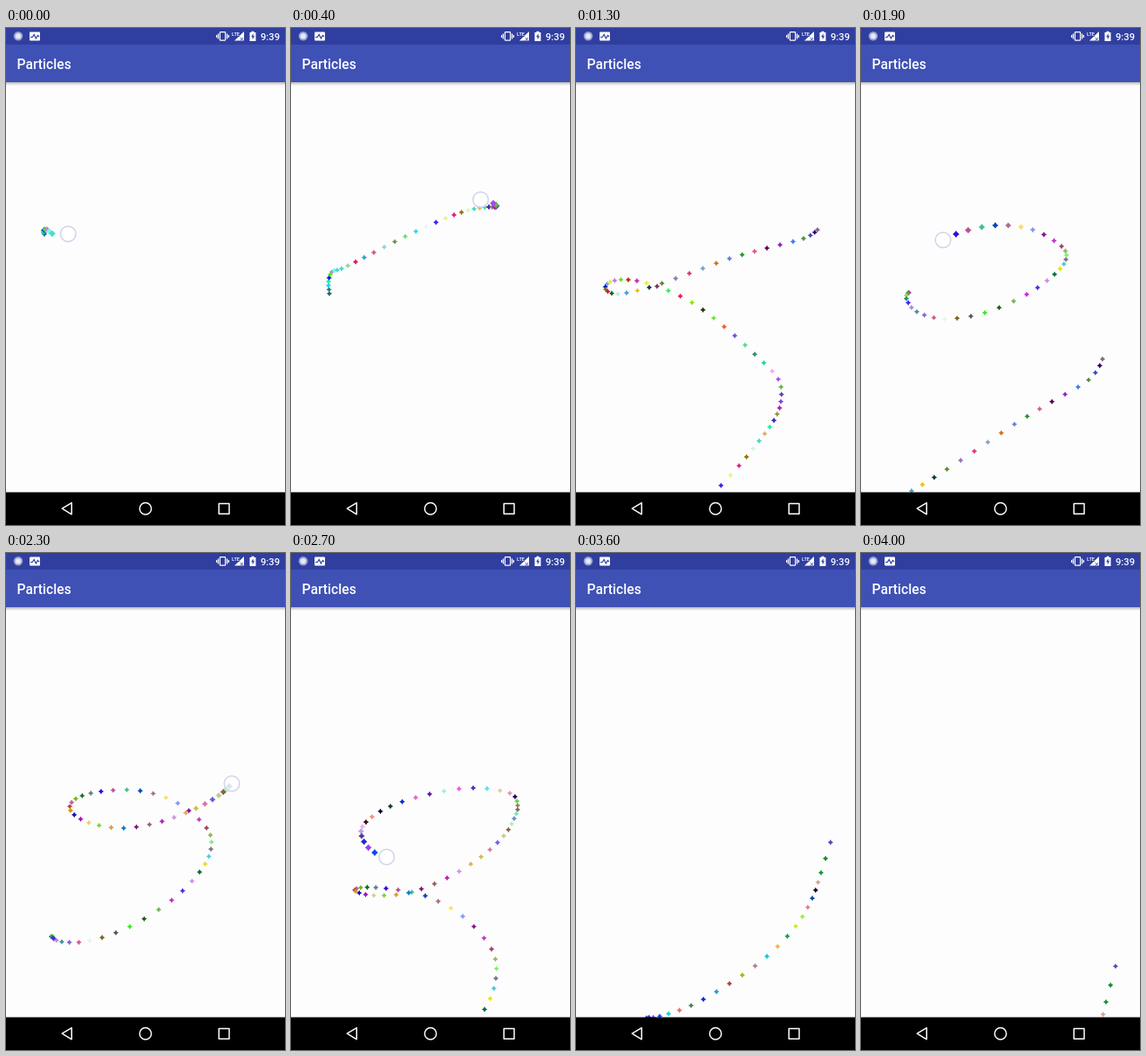
Animation, 320 px wide and 569 px high, one loop 4.1 s. Source, as an HTML page with a canvas:

```html
<!DOCTYPE html>
<html lang="en">
<head>
<meta charset="utf-8">
<title>Particles</title>
<style>
  html, body { margin: 0; width: 100%; height: 100%; overflow: hidden; background: #fefdfe; }
  canvas, svg { position: absolute; left: 0; top: 0; width: 320px; height: 569px; display: block; }
  text { font-family: Roboto, sans-serif; font-weight: 500; fill: #fff; }
</style>
</head>
<body>
<canvas id="stage" width="320" height="569"></canvas>
<svg viewBox="0 0 320 569">
  <defs>
    <linearGradient id="shade" x2="0" y2="1">
      <stop stop-color="#000" stop-opacity=".28"/>
      <stop offset="1" stop-color="#000" stop-opacity="0"/>
    </linearGradient>
  </defs>
  <rect y="62" width="320" height="4" fill="url(#shade)"/>
  <rect width="320" height="62" fill="#3f51b5"/>
  <rect width="320" height="19" fill="#303f9f"/>
  <text x="12.5" y="46.5" font-size="15.7">Particles</text>
  <text x="314" y="13.5" font-size="11.2" text-anchor="end">9:39</text>

  <!-- status icons -->
  <circle cx="14" cy="9.3" r="4.6" fill="#b9c0e2" stroke="#8f99cf" stroke-width="1.4"/>
  <circle cx="14" cy="9.3" r="2.8" fill="#e8eaf6"/>
  <rect x="27" y="4.5" width="12" height="10" rx="1" fill="#fff"/>
  <path d="M28 10.5h2.2l2-3 2.2 4.5 2-3.5 1.6 1.5" fill="none" stroke="#303f9f" stroke-width="1.2"/>
  <g fill="none" stroke="#fff" stroke-width="1.2">
    <rect x="245.4" y="4.6" width="6.2" height="9.6" rx=".8"/>
    <path d="M243.4 6.5v6M241.6 8v3M253.6 6.5v6M255.4 8v3"/>
  </g>
  <path d="M273 4v10.5h-11z" fill="#fff"/>
  <rect x="258" y="3" width="10" height="6.8" fill="#303f9f"/>
  <text x="259" y="9" font-size="5.6" textLength="auto">LTE</text>
  <path d="M268.8 11l3.2 3.4M272 11l-3.2 3.4" stroke="#303f9f" stroke-width=".9"/>
  <path d="M279.5 5h2v-1.2h3V5h2v10h-7z" fill="#fff"/>
  <path d="M283.6 6.2l-2.5 4h1.6v3l2.5-4h-1.6z" fill="#303f9f"/>

  <!-- navigation bar -->
  <rect y="531.5" width="320" height="38" fill="#000"/>
  <g fill="none" stroke="#fff" stroke-width="1.5" stroke-linejoin="round">
    <path d="M75.3 543.6v13.2L64.3 550.2z"/>
    <circle cx="160" cy="550.2" r="6.7"/>
    <rect x="244.2" y="544.4" width="11.8" height="11.8"/>
  </g>
</svg>
<script>
const LOOP = 4100, HOLD = 100, SPACING = 3, FALL = 0.06425;
const ctx = document.getElementById('stage').getContext('2d');

// Finger strokes: one x,y pair for every third emission step.
const strokes = [
  { from: 0, to: 75, pts: [
    44, 232, 43, 230.5, 47, 230.5, 58, 237, 84, 233, 119, 222.6, 155, 212, 187, 204,
    210, 201.3, 227, 202.2, 235, 204, 232, 200.6, 205, 193, 170, 181.3, 133, 172.4,
    93, 171.4, 60, 180.2, 39, 198, 34, 220.4, 48, 238.7, 84, 243, 130, 237.6,
    176, 230, 219, 226.3, 261, 222.4, 277, 218.4] },
  { from: 92, to: 193, pts: [
    55, 233, 52, 252, 64, 278, 96, 296, 142, 297.7, 190, 284.2, 222, 267.5, 235, 255.7,
    230, 244.8, 197, 228.7, 154, 225.4, 109, 236, 80, 253, 74, 274, 95, 294.3,
    135, 305.7, 179, 302, 218, 290, 244, 277, 256, 267, 260, 260.7, 251, 254.2,
    209, 254.5, 159, 266.7, 114, 284.8, 86, 305.7, 81, 323.4, 96, 343, 132, 351,
    176, 345, 219, 331.7, 252, 314, 271, 297.5, 281, 282.7, 296, 247] }
];

// Catmull-Rom position on a stroke at a given step.
function at({ from, pts }, step) {
  const last = pts.length / 2 - 1;
  const u = (step - from) / SPACING;
  const i = Math.max(0, Math.min(last - 1, Math.floor(u))), f = u - i;
  const axis = k => {
    const [a, b, c, d] = [-1, 0, 1, 2].map(o => pts[2 * Math.max(0, Math.min(last, i + o)) + k]);
    return b + f / 2 * (c - a + f * (2 * a - 5 * b + 4 * c - d + f * (3 * (b - c) + d - a)));
  };
  return [axis(0), axis(1)];
}

function colour(seed) {
  const channel = k => {
    let h = Math.imul(seed * 3 + k + 17, 0x9e3779b1);
    h = Math.imul(h ^ h >>> 15, 0x85ebca6b);
    h ^= h >>> 13;
    return (h >>> 0) % 250;
  };
  return `rgb(${channel(0)},${channel(1)},${channel(2)})`;
}

function star(x, y, age, fill) {
  const fresh = Math.max(0, 1 - age / 8);
  const outer = 3.2 + 0.7 * fresh, inner = 1.7 + 0.9 * fresh;
  ctx.beginPath();
  for (let i = 0; i < 8; i++) {
    const r = i % 2 ? inner : outer, a = i * Math.PI / 4;
    ctx.lineTo(x + r * Math.cos(a), y + r * Math.sin(a));
  }
  ctx.fillStyle = fill;
  ctx.fill();
}

function ring(x, y) {
  ctx.beginPath();
  ctx.arc(x, y, 8.8, 0, 7);
  ctx.fillStyle = 'rgba(255,255,255,.75)';
  ctx.fill();
  ctx.strokeStyle = '#cfd3e8';
  ctx.lineWidth = 1.5;
  ctx.stroke();
}

function draw(t) {
  // The opening runs slightly faster than 60 steps a second.
  const now = (t < 800 ? 8 + t * 0.06375 : 11 + t * 0.06) + 1e-6;
  ctx.clearRect(0, 0, 320, 569);
  for (const s of strokes) {
    for (let n = s.from; n <= Math.min(s.to, now); n++) {
      const [x, y] = at(s, n), age = now - n;
      const fallen = y + FALL * age * age;
      if (fallen < 540) star(x, fallen, age, colour(n));
    }
    if (now >= s.from && now <= s.to) ring(...at(s, Math.min(s.to, now + (now < 9 ? 2.7 : 1.3))));
  }
}

const start = performance.now();
function tick() {
  const t = (performance.now() - start) % LOOP;
  draw(Math.floor(t / HOLD) * HOLD);
  requestAnimationFrame(tick);
}
tick();
</script>
</body>
</html>
```
